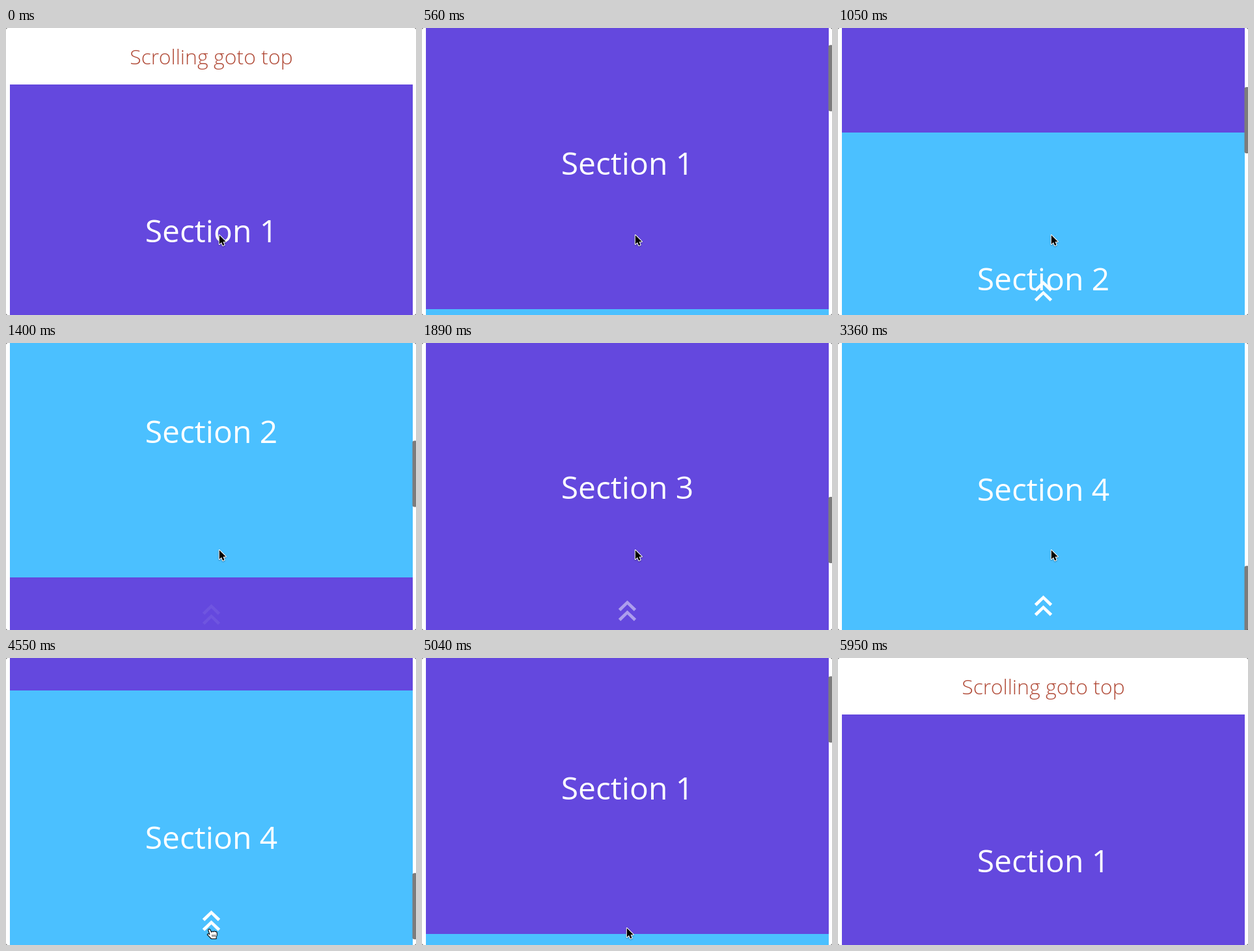
An HTML page with a canvas that plays this animation: 630x442 px, repeating every 6020 ms.

```html
<!DOCTYPE html>
<html lang="en">
<head>
<meta charset="utf-8">
<title>Scrolling goto top</title>
<style>
  html, body { margin: 0; width: 100%; height: 100%; overflow: hidden; background: #fff; }
  canvas { display: block; }
</style>
</head>
<body>
<canvas id="stage" width="630" height="442"></canvas>
<script>
const ctx = document.getElementById('stage').getContext('2d');
const W = 630, H = 442, LOOP = 6020, STEP = 70;
const CENTER = 315.5, FIRST_TOP = 86.5, SECTION = 450, MAX_SCROLL = 1437;
const PURPLE = '#6448de', BLUE = '#4bc0ff';
const RETURN_START = 4466, RETURN_TIME = 700;

// Wheel scrolling: time, position, speed
const wheel = [[140, 0, 0], [1050, 376, .6], [1890, 990, .62], [2520, 1266, .34], [3260, MAX_SCROLL, 0]];

const clamp = x => Math.max(0, Math.min(1, x));
const progress = (t, from, to) => clamp((t - from) / (to - from));
const swing = x => .5 - Math.cos(Math.PI * x) / 2;
const mix = (a, b, k) => a + (b - a) * k;

function scrollAt(t) {
  if (t >= RETURN_START) return MAX_SCROLL * (1 - swing(clamp((t - RETURN_START) / RETURN_TIME)));
  if (t <= wheel[0][0]) return 0;
  const i = wheel.findIndex(point => t < point[0]);
  if (i < 0) return MAX_SCROLL;
  const [t0, y0, v0] = wheel[i - 1], [t1, y1, v1] = wheel[i];
  const d = t1 - t0, u = (t - t0) / d, w = 1 - u;
  return w * w * ((1 + 2 * u) * y0 + u * d * v0) + u * u * ((3 - 2 * u) * y1 - w * d * v1);
}

function polygon(points) {
  ctx.beginPath();
  points.forEach(([x, y]) => ctx.lineTo(x, y));
  ctx.closePath();
}

function drawPage(scroll) {
  ctx.fillStyle = '#fff';
  ctx.fillRect(0, 0, W, H);
  ctx.textAlign = 'center';
  ctx.fillStyle = '#b14b38';
  ctx.font = '300 32px "Open Sans", sans-serif';
  ctx.fillText('Scrolling goto top', CENTER, 56 - scroll);
  ctx.font = '400 48px "Open Sans", sans-serif';
  for (let i = 0; i < 4; i++) {
    const top = FIRST_TOP + i * SECTION - scroll;
    const edge = Math.round(top);
    ctx.fillStyle = i % 2 ? BLUE : PURPLE;
    ctx.fillRect(6, edge, 619, SECTION);
    ctx.fillStyle = '#fff';
    ctx.fillText('Section ' + (i + 1), CENTER, Math.round(top + 243.6));
  }
}

function drawChevrons(t) {
  const k = swing((t - 975) / 600);
  ctx.save();
  ctx.globalAlpha = clamp(1 - 1.15 * k);
  ctx.fillStyle = '#fff';
  ctx.translate(CENTER, 388.7 + 17 * k);
  for (let i = 0; i < 2; i++) {
    polygon([[0, 0], [13.7, 13], [10.3, 16.4], [0, 6.2], [-10.3, 16.4], [-13.7, 13]]);
    ctx.fill();
    ctx.translate(0, 15.3);
  }
  ctx.restore();
}

function drawScrollbar(t, scroll) {
  const alpha = t < 210 ? 0
    : t < RETURN_START ? 1 - progress(t, 3360, 3780)
    : 1 - progress(t, 5460, 5740);
  ctx.save();
  ctx.globalAlpha = alpha;
  ctx.fillStyle = '#7c7c7c';
  ctx.beginPath();
  ctx.roundRect(624.5, 1.7 + scroll * .2377, 9, 102, 3);
  ctx.fill();
  ctx.restore();
}

function drawArrow(x, y) {
  ctx.save();
  ctx.translate(x, y);
  polygon([[.8, 1], [.8, 15], [4, 12.1], [6.2, 17], [8.6, 16], [6.5, 11.2], [10.8, 11]]);
  ctx.lineJoin = 'round';
  ctx.shadowColor = 'rgba(0,0,0,.35)';
  ctx.shadowBlur = 2;
  ctx.shadowOffsetY = 1;
  ctx.strokeStyle = '#fff';
  ctx.lineWidth = 2;
  ctx.stroke();
  ctx.shadowColor = 'transparent';
  ctx.fillStyle = '#000';
  ctx.fill();
  ctx.restore();
}

function drawHand(x, y) {
  ctx.save();
  ctx.translate(x, y);
  ctx.beginPath();
  ctx.moveTo(-3.8, 2.2);
  ctx.quadraticCurveTo(-3, -.8, -.6, 1.4);
  ctx.lineTo(1.2, 5.2);
  ctx.quadraticCurveTo(2.4, 3, 4.1, 4.7);
  ctx.quadraticCurveTo(5.6, 3, 7, 4.5);
  ctx.quadraticCurveTo(9.6, 3.8, 9.8, 7);
  ctx.quadraticCurveTo(10.2, 10.5, 8.6, 13);
  ctx.lineTo(8.6, 15.5);
  ctx.lineTo(1, 15.5);
  ctx.quadraticCurveTo(-2, 12.5, -5.2, 9.2);
  ctx.quadraticCurveTo(-4.8, 6.6, -1.6, 8.6);
  ctx.closePath();
  ctx.lineJoin = 'round';
  ctx.fillStyle = '#fff';
  ctx.fill();
  ctx.strokeStyle = '#000';
  ctx.lineWidth = 1.1;
  ctx.stroke();
  ctx.beginPath();
  for (const dx of [2.4, 4.6, 6.8]) {
    ctx.moveTo(dx, 9);
    ctx.lineTo(dx + .2, 12.5);
  }
  ctx.lineWidth = .8;
  ctx.stroke();
  ctx.restore();
}

function drawPointer(t, overLink) {
  if (t >= 5950) return;
  const go = swing(progress(t, 3990, 4340));
  const leave = progress(t, 5530, 5950) ** 2;
  const x = mix(327, 314, go) + 12 * leave;
  const y = mix(318, 415, go) + 34 * leave;
  if (overLink && y > 388) drawHand(x + .5, y + 2);
  else drawArrow(x, y);
}

function drawCorners() {
  ctx.fillStyle = '#555';
  ctx.beginPath();
  ctx.rect(0, 0, W, H);
  ctx.roundRect(0, 0, W, H, 3);
  ctx.fill('evenodd');
}

function frame(now) {
  const t = Math.floor(now % LOOP / STEP) * STEP;
  const scroll = scrollAt(t);
  const linkShown = scroll > 200;
  drawPage(scroll);
  if (linkShown) drawChevrons(t);
  drawScrollbar(t, scroll);
  drawPointer(t, linkShown);
  drawCorners();
}

let start;
function tick(now) {
  start ??= now;
  frame(now - start);
  requestAnimationFrame(tick);
}
frame(0);
requestAnimationFrame(tick);
</script>
</body>
</html>
```
